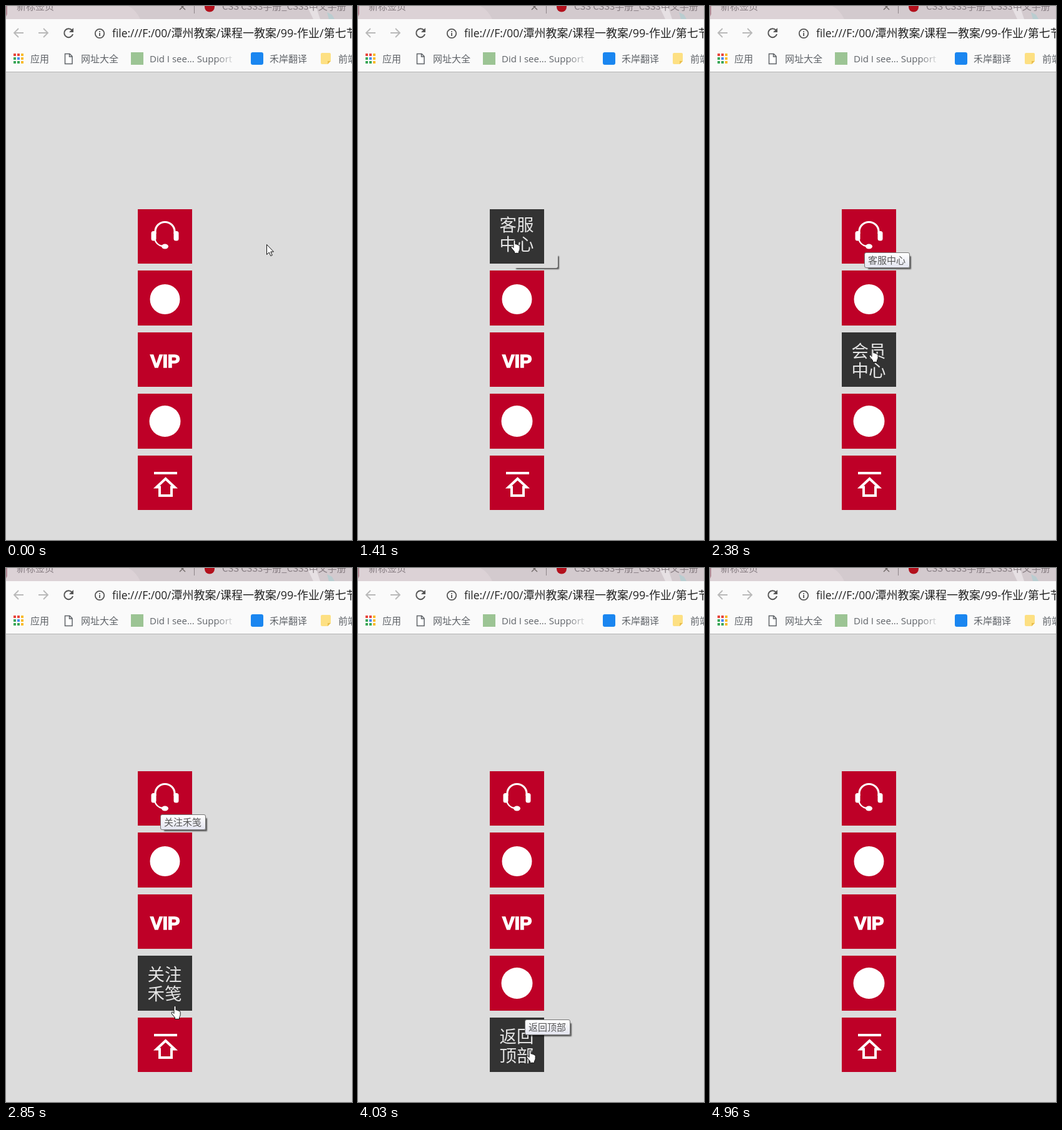
An HTML page for the animation above (5460 ms loop, 554x854 px).

```html
<!DOCTYPE html>
<html lang="zh-CN">
<head>
<meta charset="utf-8">
<title>侧边栏</title>
<style>
html, body { margin: 0; width: 100%; height: 100%; overflow: hidden; background: #dcdcdc; }
body { position: relative; font-family: 'Open Sans', 'Noto Sans CJK SC', sans-serif; }
svg { position: absolute; left: 0; top: 0; }
.bar { font-size: 15px; fill: #5f6368; }
.tab { font: 15px 'Noto Sans CJK SC', sans-serif; fill: #857b80; }
.label { font: 500 27.5px 'Noto Sans CJK SC', sans-serif; fill: #e4e4e4; }
#tip { position: absolute; width: 73px; height: 25px; border-radius: 3px; box-shadow: 4px 4px 2px -2px rgba(0,0,0,.6); }
#tip div { box-sizing: border-box; height: 100%; padding-left: 5px; border: 1px solid #767676; border-radius: 3px;
  background: linear-gradient(#fff, #e4e5f0); color: #575757; font: 15px/22px 'Noto Sans CJK SC', sans-serif; white-space: nowrap; }
</style>
</head>
<body>
<svg width="554" height="854">
  <defs>
    <linearGradient id="fade" gradientUnits="userSpaceOnUse" x1="335" x2="369" y1="0" y2="0">
      <stop stop-color="#5f6368"/><stop offset="1" stop-color="#5f6368" stop-opacity="0"/>
    </linearGradient>
  </defs>

  <!-- tab strip -->
  <path fill="#d3cace" d="M0 0H554V21H0Z"/>
  <path fill="#dcd2d6" d="M0 0H196Q208 6 215 21H0Z"/>
  <path fill="#b58d98" d="M0 0H2V13L0 17Z"/>
  <path fill="#e6e0e3" d="M482 0H496L503 21H492Z"/>
  <path fill="#b9cdd0" d="M514 10L522 14L526 21H517Z"/>
  <text class="tab" x="17" y="6">新标签页</text>
  <path stroke="#77706f" stroke-width="1.6" d="M278 -3L287 6M278 6L287 -3"/>
  <path stroke="#8f868a" d="M301.5 0V12"/>
  <circle cx="326" cy="1.5" r="8" fill="#b3101c"/>
  <text class="tab" x="346" y="6">CSS CSS3手册_CSS3中文手册</text>

  <!-- toolbar -->
  <path fill="#fafafa" d="M0 21H554V105H0Z"/>
  <path fill="#b4b4b4" d="M0 105H554V106H0Z"/>
  <g fill="none" stroke-width="1.8">
    <path stroke="#b9b9b9" d="M28 43H13M20 36L13 43L20 50M52 43H67M60 36L67 43L60 50"/>
    <path stroke="#555" stroke-width="2" d="M105.5 38.5A7 7 0 1 0 107 45"/>
    <path fill="#555" d="M108 35V42H101Z"/>
    <circle cx="150" cy="44" r="7.2" stroke="#555"/>
    <path stroke="#555" d="M150 43V48M150 40V41.8"/>
  </g>
  <text x="170" y="50" font-size="18" fill="#222"><tspan font-size="17.4">file:///F:/00/</tspan>潭州教案/课程一教案/99-作业/第七节</text>

  <!-- bookmarks -->
  <g id="apps"></g>
  <text class="bar" x="39" y="90">应用</text>
  <path fill="#fff" stroke="#5f6368" stroke-width="1.5" d="M94.5 76.5H102L106 80.5V92.5H94.5ZM101.5 76.5V81H106"/>
  <text class="bar" x="120" y="90">网址大全</text>
  <path fill="#9cc494" d="M200 74H220V94H200Z"/>
  <text class="bar" x="230" y="90" style="fill:url(#fade)">Did I see... Support</text>
  <rect x="392" y="74" width="20" height="20" rx="3" fill="#1a86f0"/>
  <text class="bar" x="422" y="90">禾岸翻译</text>
  <path fill="#fde083" d="M506 75H518Q520 75 520 77V88L515 93H506Q504 93 504 91V77Q504 75 506 75Z"/>
  <path fill="#e9bd4d" d="M515 93V88H520Z"/>
  <text class="bar" x="532" y="90">前端</text>

  <g id="tiles"></g>
  <g id="icons" fill="#fff">
    <g>
      <path fill="none" stroke="#fff" stroke-width="3.2" d="M239 364V360.5A15.5 15 0 0 1 270 360.5V364"/>
      <rect x="232.5" y="360" width="8" height="15.5" rx="3.5"/>
      <rect x="268.5" y="360" width="8" height="15.5" rx="3.5"/>
      <path fill="none" stroke="#fff" stroke-width="2.4" d="M238.5 374Q241 382 250 384"/>
      <ellipse cx="254.5" cy="384.5" rx="5.5" ry="4"/>
    </g>
    <circle cx="254.5" cy="469" r="24"/>
    <text x="231" y="578" stroke="#fff" stroke-width="1.5" style="font:bold 29.5px 'Liberation Sans',sans-serif">VIP</text>
    <circle cx="254.5" cy="664" r="25"/>
    <g>
      <path d="M237 745H274V749H237Z"/>
      <path fill="none" stroke="#fff" stroke-width="4" d="M255.5 756L270 769.5H265V783H246V769.5H241Z"/>
    </g>
  </g>
</svg>

<div id="tip"><div></div></div>

<svg width="554" height="854">
  <g id="cursor" fill="#fff" stroke="#111" stroke-linejoin="round">
    <path id="arrow" d="M.5 .5V16.5L4.3 13L6.8 18.6L9.3 17.5L6.8 12H11.5Z"/>
    <path id="hand" transform="translate(-5.5 -.5)" d="M4.5 12V2.5Q4.5 .8 6 .8Q7.5 .8 7.5 2.5V7.5Q9 6.6 10 8.2Q11.6 7.5 12.5 9.1Q14.5 8.8 14.6 10.8V15Q14.5 17 13 19V21.8H6V19.5L1 13.5Q0 11.5 1.3 10.6Q2.7 10.3 4.5 13Z"/>
  </g>
</svg>

<script>
const $ = id => document.getElementById(id);
const LOOP = 5460;
const labels = ['客服中心', '在线咨询', '会员中心', '关注禾笺', '返回顶部'];
const tileTop = i => 325 + 98.4 * i;

$('apps').innerHTML = ['#e8453c', '#e8453c', '#f9bb2d', '#3aa757', '#4688f1', '#f9bb2d', '#3aa757', '#3aa757', '#f9bb2d']
  .map((c, i) => `<rect x="${12 + i % 3 * 6}" y="${76 + (i / 3 | 0) * 6}" width="4" height="4" fill="${c}"/>`).join('');

$('tiles').innerHTML = labels.map((s, i) => {
  const top = Math.round(tileTop(i)), h = Math.round(tileTop(i) + 87.4) - top;
  const base = top + (i ? 39.5 : 34.5); // the first label sits higher
  return `<g><rect x="211" y="${top}" width="87" height="${h}"/><g class="label">
    <text x="226.5" y="${base}">${s.slice(0, 2)}</text><text x="226.5" y="${base + 31.5}">${s.slice(2)}</text></g></g>`;
}).join('');
const tiles = [...$('tiles').children], icons = [...$('icons').children];

// pointer path: time, x, y; repeated times are jumps
const path = [
  [0, 417, 381], [340, 417, 381], [340, 409, 381], [420, 409, 381], [420, 401, 380], [620, 401, 380],
  [940, 249.5, 374], [2200, 249.5, 374], [2200, 248, 374], [2240, 248, 374], [2510, 270, 700], [3490, 270, 700],
  [3490, 272, 712], [3540, 272, 712], [3570, 275, 770], [4590, 275, 770], [4900, 442, 862], [LOOP, 442, 862]
];
// tooltip states: start time, x, y, label index
const tips = [[1410, 247, 394, 0], [2850, 247, 394, 3], [2910, 267, 722, 3], [4030, 267, 722, 4], [4100, 270, 788, 4]];

const clamp = v => Math.max(0, Math.min(1, v));

function pointer(t) {
  const i = path.findIndex(p => p[0] > t);
  const [t0, x0, y0] = path[i - 1], [t1, x1, y1] = path[i];
  const k = (t - t0) / (t1 - t0), e = k * k * (3 - 2 * k);
  return [x0 + (x1 - x0) * e, y0 + (y1 - y0) * e];
}

function draw(now) {
  const t = now % LOOP, [x, y] = pointer(t);
  let over = false;
  tiles.forEach((tile, i) => {
    const on = x >= 211 && x < 298 && y >= tileTop(i) && y < tileTop(i) + 92;
    over = over || on;
    tile.firstChild.setAttribute('fill', on ? '#333' : '#be0027');
    tile.lastChild.style.display = on ? '' : 'none';
    icons[i].style.display = on ? 'none' : '';
  });
  $('cursor').setAttribute('transform', `translate(${Math.round(x)} ${Math.round(y)})`);
  $('arrow').style.display = over ? 'none' : '';
  $('hand').style.display = over ? '' : 'none';

  const tip = $('tip'), box = tip.firstChild, state = tips.filter(s => s[0] <= t).pop();
  tip.style.opacity = state ? clamp((4960 - t) / 200) : 0;
  if (state) {
    tip.style.left = state[1] + 'px';
    tip.style.top = state[2] + 'px';
    box.textContent = labels[state[3]];
    box.style.opacity = clamp((t - 1430) / 190);
  }
}

const start = performance.now();
(function frame() {
  draw(performance.now() - start);
  requestAnimationFrame(frame);
})();
</script>
</body>
</html>
```
